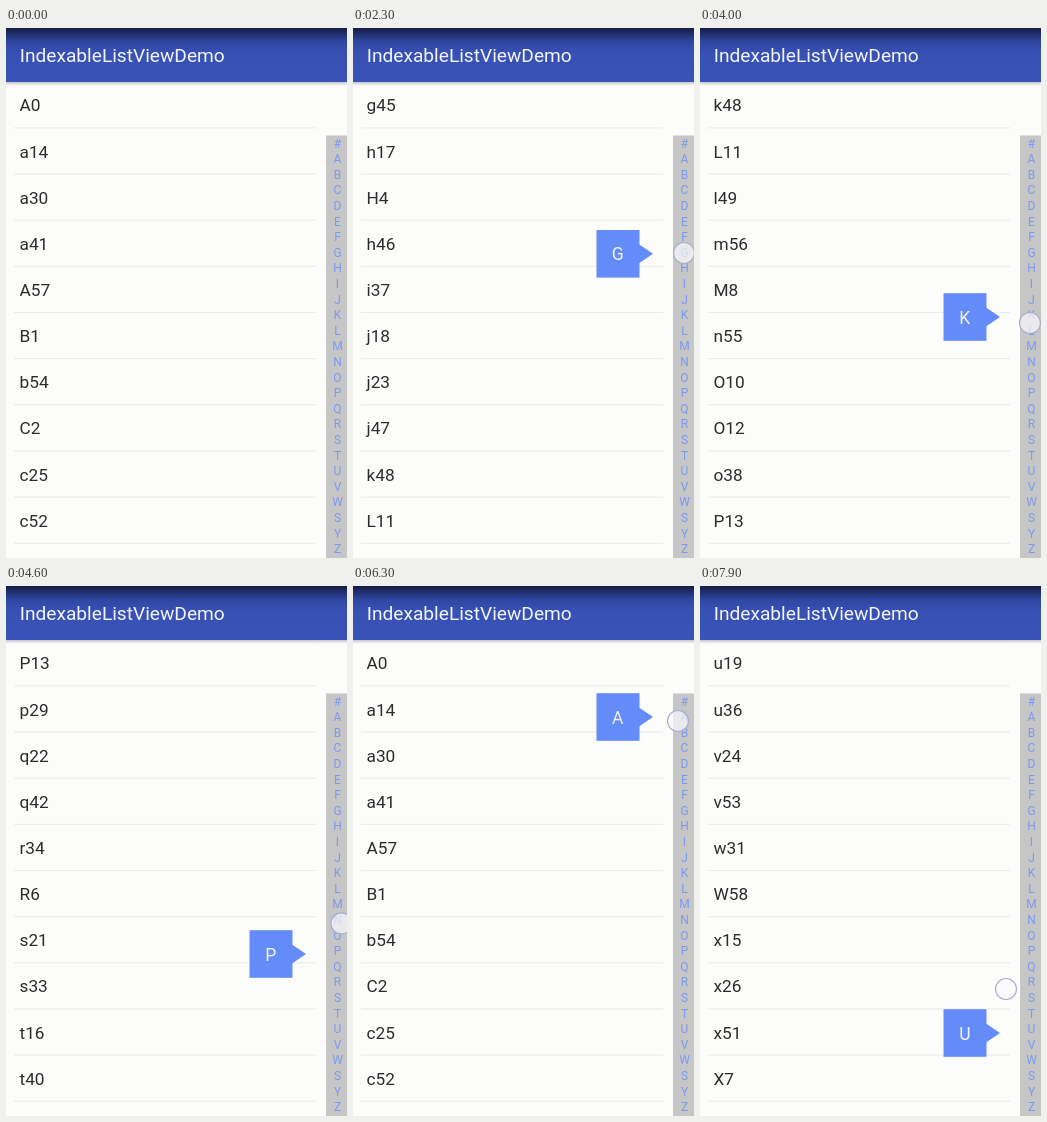
Animation of 341x530 px, one loop 8 s. Source, as an HTML page with a canvas:

```html
<!DOCTYPE html>
<html lang="en">
<head>
<meta charset="utf-8">
<title>IndexableListViewDemo</title>
<style>
  html, body { margin: 0; width: 100%; height: 100%; overflow: hidden; background: #fcfcfb; }
  canvas { display: block; width: 341px; height: 530px; }
</style>
</head>
<body>
<canvas id="stage"></canvas>
<script>
const W = 341, H = 530, LOOP = 8000, STEP = 100;
const FONT = 'Roboto, "Noto Sans", sans-serif';
const ROW = 46.15, LIST_TOP = 54;
const BAR = { x: 320, y: 107.5, cell: 15.6 };
const SWIPE_START = 500, SWIPE_END = 800, DRAG_START = 2300;

// Each initial is labelled with its position, then the labels are sorted.
const ITEMS = [...'ABCDHFRXMTOLOPaxthjuesqjvcxedpawesryuioztaqdfghjklyxcvbnmAWE']
  .map((c, i) => c + i)
  .sort((a, b) => (a.toLowerCase() < b.toLowerCase() ? -1 : 1));
const LETTERS = [...'#ABCDEFGHIJKLMNOPQRSTUVWSYZ'];
const MAX_SCROLL = ITEMS.length * ROW - (H - LIST_TOP);

// Finger key points: [time, x, y]
const SWIPE = [[SWIPE_START, 240, 372], [SWIPE_END, 280, 220]];
const DRAG = [[DRAG_START, 331, 225], [2800, 330, 256], [3200, 330, 226], [3400, 330, 226],
  [4000, 330, 295], [4400, 333, 384], [5100, 338, 289], [5400, 326, 137],
  [6300, 325, 135], [7100, 331, 530], [7700, 331, 535], [7900, 306, 403]];

const canvas = document.getElementById('stage');
const ctx = canvas.getContext('2d');
const scale = window.devicePixelRatio || 1;
canvas.width = Math.round(W * scale);
canvas.height = Math.round(H * scale);

const clamp = (v, lo, hi) => Math.max(lo, Math.min(hi, v));
const easeOut = (u, power) => 1 - (1 - u) ** power;

function fingerAt(keys, t) {
  const i = clamp(keys.findIndex(k => k[0] > t), 1, keys.length - 1);
  const next = t >= keys[keys.length - 1][0] ? keys.length - 1 : i;
  const a = keys[next - 1], b = keys[next];
  const u = easeOut(clamp((t - a[0]) / (b[0] - a[0]), 0, 1), 2);
  return { x: a[1] + (b[1] - a[1]) * u, y: a[2] + (b[2] - a[2]) * u };
}

// The selection trails the finger by one step.
function sectionAt(t) {
  const { y } = fingerAt(DRAG, t - STEP);
  return clamp(Math.floor((y - BAR.y) / BAR.cell), 0, LETTERS.length - 1);
}

function scrollAt(t) {
  if (t < SWIPE_START) return 0;
  if (t < DRAG_START) {
    const u = clamp((t - SWIPE_START + STEP) / 1000, 0, 1);
    return 607.5 * easeOut(u ** 1.5, 4);
  }
  const letter = LETTERS[sectionAt(t)];
  const row = ITEMS.findIndex(s => s[0].toUpperCase() === letter);
  return clamp(row * ROW, 0, MAX_SCROLL);
}

function text(str, x, y, size, color, align = 'left') {
  ctx.font = `400 ${size}px ${FONT}`;
  ctx.fillStyle = color;
  ctx.textAlign = align;
  ctx.fillText(str, x, y);
}

function fade(y, h, stops) {
  const g = ctx.createLinearGradient(0, y, 0, y + h);
  stops.forEach(([at, color]) => g.addColorStop(at, color));
  ctx.fillStyle = g;
  ctx.fillRect(0, y, W, h);
}

function drawList(scroll) {
  ITEMS.forEach((item, i) => {
    const top = LIST_TOP + i * ROW - scroll;
    if (top < -ROW || top > H) return;
    text(item, 13.5, top + 29.4, 17.25, '#2c2c2c');
    ctx.fillStyle = '#ebecec';
    ctx.fillRect(8, top + ROW - 0.8, 302, 1.1);
  });
}

function drawHeader(lit) {
  const top = lit ? '#2e439a' : '#141c44';
  const mid = lit ? '#344cac' : '#2f46a0';
  fade(0, LIST_TOP, [[0, top], [0.25, mid], [0.45, '#3750b4'], [1, '#3a53b8']]);
  fade(LIST_TOP, 4, [[0, 'rgba(90,95,120,.35)'], [1, 'rgba(120,120,120,0)']]);
  text('IndexableListViewDemo', 13.7, 34.1, 19.15, '#f4f6ff');
}

function drawBar() {
  ctx.fillStyle = '#c6c6c6';
  ctx.fillRect(BAR.x, BAR.y, W - BAR.x, H - BAR.y);
  LETTERS.forEach((c, i) => text(c, 331.5, 119.5 + i * BAR.cell, 12, '#7c99f2', 'center'));
}

function drawPreview(index) {
  const y = 131 + (index - 1) * 15.8;
  ctx.fillStyle = '#648cf8';
  ctx.fillRect(243.5, y - 23.8, 43, 47.6);
  ctx.beginPath();
  ctx.moveTo(286, y - 9.5);
  ctx.lineTo(300, y);
  ctx.lineTo(286, y + 9.5);
  ctx.fill();
  text(LETTERS[index], 264.8, y + 6.5, 17.5, '#eef3ff', 'center');
}

function drawFinger({ x, y }) {
  ctx.beginPath();
  ctx.arc(x, y, 10.5, 0, Math.PI * 2);
  ctx.fillStyle = 'rgba(250,250,253,.68)';
  ctx.fill();
  ctx.strokeStyle = '#a9aecb';
  ctx.lineWidth = 1.2;
  ctx.stroke();
}

function draw(t) {
  const dragging = t >= DRAG_START;
  ctx.setTransform(scale, 0, 0, scale, 0, 0);
  ctx.fillStyle = '#fcfcfb';
  ctx.fillRect(0, 0, W, H);
  drawList(scrollAt(t));
  drawHeader(t >= SWIPE_START && !dragging);
  drawBar();
  if (dragging) {
    drawPreview(sectionAt(t));
    drawFinger(fingerAt(DRAG, t));
  } else if (t >= SWIPE_START && t < SWIPE_END) {
    drawFinger(fingerAt(SWIPE, t));
  }
}

const start = performance.now();
function tick() {
  const t = (performance.now() - start) % LOOP;
  draw(Math.floor(t / STEP) * STEP);
  requestAnimationFrame(tick);
}
tick();
</script>
</body>
</html>
```
